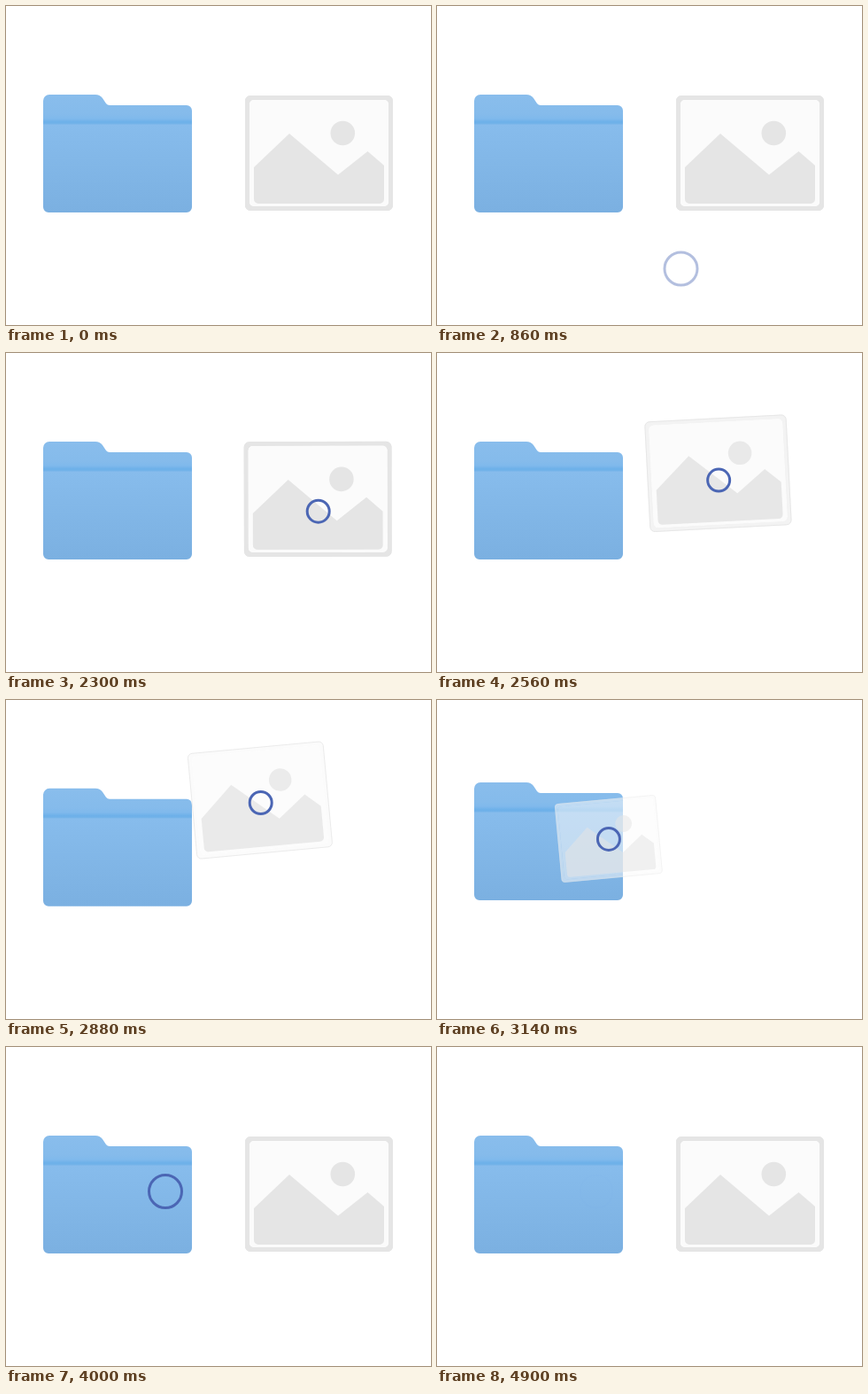
An HTML page with a canvas that plays this animation: 480x360 px, repeating every 5640 ms.

```html
<!DOCTYPE html>
<html lang="en">
<head>
<meta charset="utf-8">
<title>Drag a file into a folder</title>
<style>
  html, body { margin: 0; width: 100%; height: 100%; overflow: hidden; background: #fff; }
  canvas { display: block; width: 480px; height: 360px; }
</style>
</head>
<body>
<canvas id="stage" width="480" height="360"></canvas>
<script>
const ctx = document.getElementById('stage').getContext('2d');
const LOOP = 5640;
const TAU = Math.PI * 2;

const mix = (a, b, p) => a + (b - a) * p;
const mixAll = (a, b, p) => a.map((v, i) => mix(v, b[i], p));

// Cubic bezier easing with control points (x1, 0) and (x2, 1).
const bezier = (x1, x2) => x => {
  if (x <= 0) return 0;
  if (x >= 1) return 1;
  let lo = 0, hi = 1;
  for (let i = 0; i < 24; i++) {
    const s = (lo + hi) / 2, r = 1 - s;
    if (3 * r * r * s * x1 + 3 * r * s * s * x2 + s ** 3 < x) lo = s; else hi = s;
  }
  return lo * lo * (3 - 2 * lo);
};
const easeOut = bezier(0, 0.58);
const easeInOut = bezier(0.42, 0.58);

// Each phase: start, duration, easing
const PHASES = {
  appear: [760, 360, easeOut],
  reach: [1660, 600, easeOut],
  drag: [2240, 600, easeInOut],
  drop: [2840, 400, easeInOut],
  reset: [3620, 360, easeOut],
  vanish: [4560, 360, easeOut]
};

// Pointer: x, y, radius
const POINTER = [[275.5, 296.5, 18.5], [354, 180, 12.5], [290, 115, 12.5], [180, 163, 12.5], [180, 163, 18.5]];
// Picture: x, y, scale, degrees, opacity, border grey
const PICTURE = [
  [353.5, 166, 1, 0, 1, 229],
  [289.2, 112, 0.93, -5.3, 0.75, 250],
  [180, 163, 0.65, -5.3, 0.5, 250],
  [142, 180, 0.06, -5.3, 0, 250]
];

// Walks through the poses as the phases progress one after another.
const pose = (poses, steps) => steps.reduce((now, p, i) => mixAll(now, poses[i + 1], p), poses[0]);

function fillRound(x, y, w, h, r, color) {
  ctx.fillStyle = color;
  ctx.beginPath();
  ctx.roundRect(x, y, w, h, r);
  ctx.fill();
}

function drawFolder(y) {
  ctx.save();
  ctx.translate(0, y);
  const paint = ctx.createLinearGradient(0, 0, 0, 133);
  [[0, '#89bdec'], [22, '#85bbeb'], [27, '#80b9ec'], [31, '#6cb0e9'],
   [33, '#74b3e9'], [34, '#87bcec'], [133, '#7bb0e1']]
    .forEach(([at, color]) => paint.addColorStop(at / 133, color));
  ctx.fillStyle = paint;
  ctx.beginPath();
  ctx.moveTo(49, 0);
  ctx.lineTo(101, 0);
  ctx.quadraticCurveTo(106, 0, 109, 4);
  ctx.lineTo(113, 10);
  ctx.quadraticCurveTo(114.5, 12, 117, 12);
  ctx.arcTo(210, 12, 210, 20, 6);
  ctx.arcTo(210, 133, 200, 133, 6);
  ctx.arcTo(42, 133, 42, 120, 6);
  ctx.arcTo(42, 0, 50, 0, 7);
  ctx.fill();
  ctx.restore();
}

function drawPicture([x, y, scale, degrees, opacity, border]) {
  if (opacity <= 0) return;
  ctx.save();
  ctx.globalAlpha = opacity;
  ctx.translate(x, y);
  ctx.rotate(degrees * Math.PI / 180);
  ctx.scale(scale, scale);
  // Layers are cut out of each other so that they fade evenly.
  ctx.fillStyle = `rgb(${border},${border},${border})`;
  ctx.beginPath();
  ctx.roundRect(-83.5, -65, 167, 130, 6);
  ctx.roundRect(-78.5, -60, 157, 120, 5);
  ctx.fill('evenodd');
  fillRound(-78.5, -60, 157, 120, 5, '#fbfbfb');
  ctx.strokeStyle = '#e5e5e5';
  ctx.lineWidth = 1;
  ctx.beginPath();
  ctx.roundRect(-83, -64.5, 166, 129, 5.5);
  ctx.stroke();

  ctx.fillStyle = '#e5e5e5';
  ctx.beginPath();
  ctx.moveTo(-73.5, 16);
  ctx.lineTo(-33.5, -22);
  ctx.lineTo(21.5, 24.5);
  ctx.lineTo(55, -2);
  ctx.lineTo(73.5, 14);
  ctx.arcTo(73.5, 57, 60, 57, 5);
  ctx.arcTo(-73.5, 57, -73.5, 40, 5);
  ctx.fill();
  ctx.beginPath();
  ctx.arc(26.8, -22.5, 13.8, 0, TAU);
  ctx.fill();
  ctx.restore();
}

function drawLabel(x, opacity) {
  ctx.save();
  ctx.globalAlpha = opacity;
  ctx.fillStyle = '#5f7896';
  ctx.font = '16px "Liberation Sans", sans-serif';
  ctx.textAlign = 'center';
  ctx.fillText('File', x, 262);
  ctx.restore();
}

function drawPointer([x, y, radius], opacity) {
  ctx.save();
  ctx.globalAlpha = opacity;
  ctx.strokeStyle = '#4b66b4';
  ctx.lineWidth = 3;
  ctx.beginPath();
  ctx.arc(x, y, radius, 0, TAU);
  ctx.stroke();
  ctx.restore();
}

function draw(time) {
  const at = {};
  for (const [name, [start, duration, ease]] of Object.entries(PHASES)) {
    at[name] = ease((time - start) / duration);
  }
  const { appear, reach, drag, drop, reset, vanish } = at;

  ctx.fillStyle = '#fff';
  ctx.fillRect(0, 0, 480, 360);
  drawFolder(100 - 8 * drop + 8 * reset);
  if (reset > 0) {
    const x = mix(563.5, 353.5, reset);
    drawPicture([x, ...PICTURE[0].slice(1)]);
    drawLabel(x, 1 - reset);
  }
  drawPicture(pose(PICTURE, [drag, drop, reset]));
  drawPointer(pose(POINTER, [reach, drag, drop, reset]), appear * (1 - vanish));
}

const begin = performance.now();
function tick() {
  draw((performance.now() - begin) % LOOP);
  requestAnimationFrame(tick);
}
tick();
</script>
</body>
</html>
```
